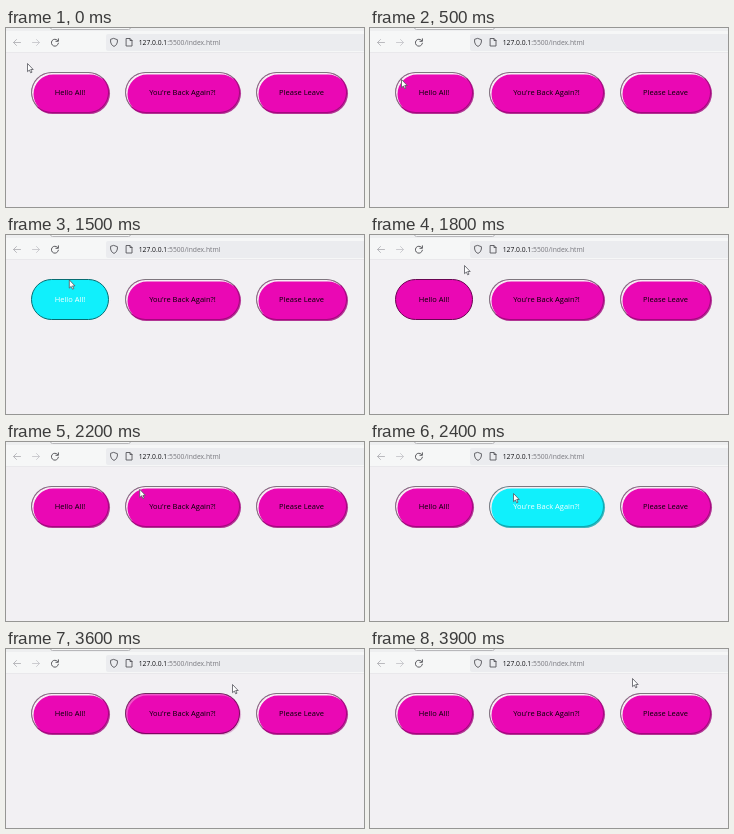
Write an HTML page that moves like this. It is 358 px wide and 179 px high and loops after 4 s.

```html
<!DOCTYPE html>
<html lang="en">
<head>
<meta charset="utf-8">
<title>Hover buttons</title>
<style>
html, body { margin: 0; width: 100%; height: 100%; overflow: hidden; background: #f2f0f3; }
body { position: relative; font-family: "Open Sans", "Noto Sans", sans-serif; }
svg { position: absolute; left: 0; top: 0; }
.btn {
  position: absolute; top: 44px; height: 41px; box-sizing: border-box;
  border: 1px solid; border-radius: 21px;
  font-size: 7.5px; line-height: 39px; text-align: center; white-space: nowrap;
}
</style>
</head>
<body>
<svg width="358" height="179" viewBox="0 0 358 179" fill="none" stroke-linecap="round" stroke-linejoin="round">
  <rect width="358" height="24" fill="#f6f7f7"/>
  <rect width="358" height="3" fill="#eeeff0"/>
  <rect x="44.500" y="-8" width="80" height="9.500" rx="2" fill="#f6f7f7" stroke="#aaaaae" stroke-width=".8"/>
  <rect x="100" y="6" width="264" height="17" rx="2" fill="#ebecef"/>
  <path d="M0 24.5H358" stroke="#e9e8eb"/>
  <g stroke-width=".9">
    <path d="M14.5 14.5H7.5M10.5 11.5L7.5 14.5L10.5 17.5" stroke="#b4b4b8"/>
    <path d="M26.5 14.5H33.5M30.5 11.5L33.5 14.5L30.5 17.5" stroke="#c8c8cc"/>
    <path d="M51.6 12.4A3.5 3.5 0 1 0 52.4 15.2M52.4 10.8V13.3H49.9" stroke="#4a4a50"/>
    <path d="M108 10.5L111.4 11.7V14Q111.2 17 108 18.5Q104.8 17 104.6 14V11.7Z" stroke="#55555b"/>
    <path d="M120.5 10.5H124L126 12.5V18H120.5ZM124 10.7V12.5H126" stroke="#55555b"/>
  </g>
  <text x="132.700" y="17" font-size="6.75" fill="#77777d">
    <tspan fill="#101014">127.0.0.1</tspan>:5500/index.html</text>
</svg>
<div class="btn" style="left:25px;width:78px">Hello All!</div>
<div class="btn" style="left:119px;width:115px">You're Back Again?!</div>
<div class="btn" style="left:250px;width:91px">Please Leave</div>
<svg width="358" height="179" viewBox="0 0 358 179">
  <path id="cursor" d="M.5 .5V8.7L2.4 7L3.7 9.8L5 9.2L3.7 6.5H6.2Z" fill="#fff" stroke="#55555c" stroke-width=".8" stroke-linejoin="round"/>
</svg>
<script>
const LOOP = 4000, STEP = 100;
const FADE = 200, SETTLE = 300;
const PINK = [234, 8, 180], CYAN = [16, 240, 252];
const BLACK = [0, 0, 0], WHITE = [245, 255, 255], GREY = [126, 118, 126], LIGHT = [246, 238, 244];

const start = { x: 21, y: 35 };
const moves = [
  { from: 0, to: 200, x: 31, y: 51 },
  { from: 500, to: 900, x: 42, y: 54 },
  { from: 1300, to: 1800, x: 94, y: 30 },
  { from: 1800, to: 2300, x: 143, y: 51 },
  { from: 3100, to: 3600, x: 226, y: 35 },
  { from: 3600, to: 3900, x: 262, y: 29 }
];
const visits = [{ enter: 500, leave: 1600 }, { enter: 2200, leave: 3300 }];

const buttons = document.querySelectorAll(".btn");
const cursor = document.getElementById("cursor");

const ramp = (t, from, to) => Math.min(1, Math.max(0, (t - from) / (to - from)));
const lerp = (a, b, p) => a + (b - a) * p;
const mix = (a, b, p) => a.map((v, i) => Math.round(lerp(v, b[i], p)));
const rgb = c => `rgb(${c})`;

function pointer(t) {
  return moves.reduce((at, m) => {
    const p = ramp(t, m.from, m.to);
    return { x: lerp(at.x, m.x, p), y: lerp(at.y, m.y, p) };
  }, start);
}

// 0 to 1 after entering, back to 0 after leaving
function pulse(visit, t, delay, length) {
  if (!visit) return 0;
  const rise = from => ramp(t, from + delay, from + delay + length);
  return rise(visit.enter) - rise(visit.leave);
}

// the colour fades first, then the raised edge follows
function paint(el, visit, t) {
  const hover = pulse(visit, t, 0, FADE);
  const edge = 1 - pulse(visit, t, FADE, SETTLE);
  const fill = mix(PINK, CYAN, hover);
  const line = mix(fill, BLACK, 0.55), shade = mix(fill, BLACK, 0.3);
  const lit = rgb(mix(line, GREY, edge)), dark = rgb(mix(line, shade, edge));
  el.style.backgroundColor = rgb(fill);
  el.style.color = rgb(mix(BLACK, WHITE, hover));
  el.style.borderColor = `${lit} ${dark} ${dark} ${lit}`;
  el.style.boxShadow =
    `inset 1.5px 1.5px 0 rgba(${LIGHT},${edge}), 1px 1px 0 rgba(${shade},${edge * 0.8})`;
}

function draw(now) {
  const t = Math.floor(now % LOOP / STEP) * STEP;
  const { x, y } = pointer(t);
  cursor.setAttribute("transform", `translate(${x} ${y})`);
  buttons.forEach((el, i) => paint(el, visits[i], t));
}

function frame(now) {
  draw(now);
  requestAnimationFrame(frame);
}
draw(0);
requestAnimationFrame(frame);
</script>
</body>
</html>
```
